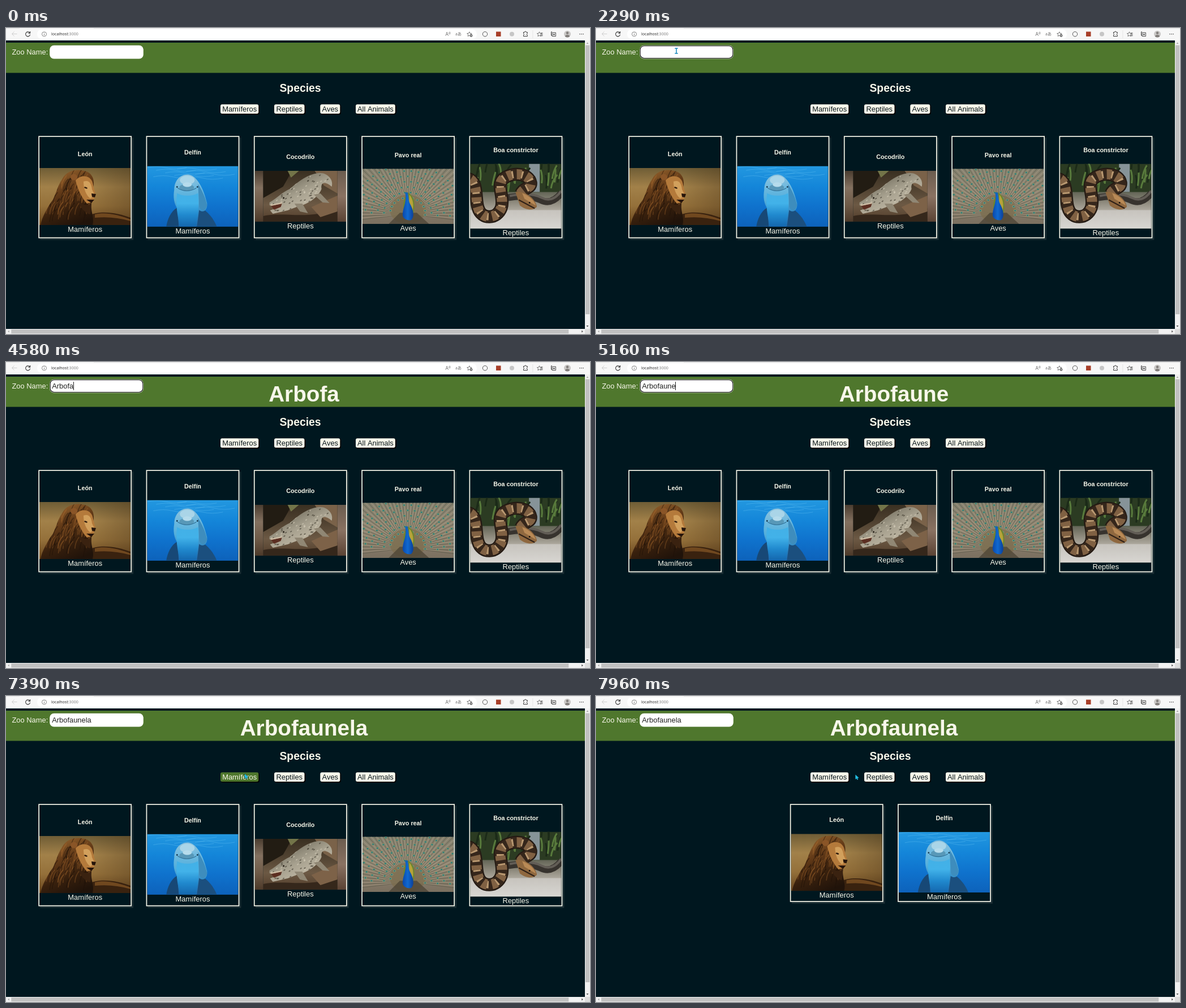
An HTML page with a canvas for the animation above (8000 ms loop, 1032 px wide and 542 px high).

```html
<!DOCTYPE html>
<html lang="es">
<head>
<meta charset="utf-8">
<title>Zoo</title>
<style>
  html, body { margin: 0; width: 100%; height: 100%; overflow: hidden; background: #00171f; }
  canvas { display: block; }
</style>
</head>
<body>
<canvas id="stage" width="1032" height="542"></canvas>
<script>
const ctx = document.getElementById('stage').getContext('2d');
const LOOP = 8000;
const NIGHT = '#00171f', GREEN = '#4f772d', CREAM = '#f8f7ea';
const SANS = '"Liberation Sans", Arial, sans-serif';
const UI = '"Open Sans", "Noto Sans", sans-serif';
const ZOO = 'Arbofaunela';
const KEYS = [3030, 3860, 3930, 4260, 4420, 4580, 4750, 4900, 5160, 5300, 5460];
const CARET_ON = [[1800, 2290], [2860, 3610], [3860, 6050], [6560, 7090]];

// ---------- drawing helpers ----------
function rect(color, x, y, w, h) {
  ctx.fillStyle = color;
  ctx.fillRect(x, y, w, h);
}
function round(color, x, y, w, h, r) {
  ctx.fillStyle = color;
  ctx.beginPath();
  ctx.roundRect(x, y, w, h, r);
  ctx.fill();
}
function oval(color, x, y, rx, ry = rx, turn = 0) {
  ctx.fillStyle = color;
  ctx.beginPath();
  ctx.ellipse(x, y, rx, ry, turn, 0, Math.PI * 2);
  ctx.fill();
}
function shape(color, d) {
  ctx.fillStyle = color;
  ctx.fill(new Path2D(d));
}
function line(color, width, d) {
  ctx.strokeStyle = color;
  ctx.lineWidth = width;
  ctx.stroke(new Path2D(d));
}
function text(str, x, y, font, color, align = 'left') {
  ctx.font = font;
  ctx.fillStyle = color;
  ctx.textAlign = align;
  ctx.fillText(str, x, y);
}
function fade(x0, y0, x1, y1, ...colors) {
  const g = ctx.createLinearGradient(x0, y0, x1, y1);
  colors.forEach((c, i) => g.addColorStop(i / (colors.length - 1), c));
  return g;
}
function random(seed) {
  return () => (seed = seed * 16807 % 2147483647) / 2147483647;
}
function within(d, paint) {
  ctx.save();
  ctx.clip(new Path2D(d));
  paint();
  ctx.restore();
}

// ---------- pictures, each 161 wide ----------
function lion(h) {
  rect(fade(0, 0, 0, h, '#6f5d36', '#a28149', '#94703a', '#65431d'), 0, 0, 161, h);
  rect(fade(90, 0, 161, 0, 'rgba(70,50,24,0)', 'rgba(70,50,24,.35)'), 90, 0, 71, h);
  shape('#39220f', 'M88 84C108 74 140 80 161 88V101H70Z');
  shape('#70481f', 'M98 82C118 77 142 84 161 91V94C140 88 120 86 98 88Z');
  const mane = 'M40 20C48 4 66 1 80 5C92 8 97 18 96 30L92 62C90 78 98 88 94 101H2C4 88 14 70 24 56C30 44 33 30 40 20Z';
  shape(fade(30, 8, 70, 100, '#90602c', '#643b18', '#38200d', '#20130a'), mane);
  within(mane, () => {
    const rnd = random(11);
    for (let i = 0; i < 90; i++) {
      const x = 20 + rnd() * 72, y = rnd() * 75;
      line(i % 2 ? 'rgba(30,16,7,.45)' : 'rgba(170,108,48,.35)', 1.6, `M${x} ${y}q-8 8 -9 22`);
    }
  });
  shape('#b47a3b', 'M64 22C72 11 90 12 94 26L99 46L95 60L84 63C76 54 68 40 64 22Z');
  shape('#d2a05c', 'M78 24C88 20 92 28 93 38L98 48L90 54C82 48 78 36 78 24Z');
  oval('#8a5527', 61, 16, 6, 5.5);
  oval('#2d190c', 82, 35, 3, 1.4, .3);
  shape('#26150b', 'M92 45L100 46L98 52L93 51ZM83 56L97 56L92 62Z');
  shape('#3a2210', 'M68 56C76 66 86 68 92 63L90 82C80 80 72 70 68 56Z');
}

function dolphin(h) {
  rect(fade(0, 0, 0, h, '#2398e0', '#1486d9', '#0f72cd', '#0d62bb'), 0, 0, 161, h);
  for (let i = 0; i < 9; i++) {
    const y = 3 + i * 2.3, x = (i * 53) % 90;
    line('rgba(110,200,245,.35)', 1, `M${x} ${y}q18 -4 34 0t36 0`);
  }
  shape('#174876', 'M53 74C42 80 36 94 34 107H62L66 78Z');
  shape('#1b4f7e', 'M92 72C108 80 118 94 123 107H86Z');
  shape(fade(0, 15, 0, 107, '#8fc3dd', '#6db9df', '#52aedc', '#2e88c4', '#1d68ac'),
    'M48 42C48 26 58 15 72 15C88 16 100 40 106 66C107 78 100 84 92 78L88 107H56L54 76C47 66 46 54 48 42Z');
  shape('#3e8dbd', 'M90 32C98 44 104 58 106 70C102 82 95 80 92 72Z');
  shape(fade(0, 46, 0, 107, '#43b0e6', '#42b2e9', '#2089ce', '#1467ae'),
    'M53 48C62 54 80 54 90 48C92 66 90 90 86 107H58C54 90 50 68 53 48Z');
  oval('#aad5e8', 71, 25, 13, 8);
  oval('#5898b8', 70, 38, 13, 6);
  oval('#b6dcec', 71, 33, 8, 4);
  line('#2f6f95', 1.2, 'M54 39Q70 49 87 39');
  oval('#183b52', 53, 37, 1.4);
  oval('#183b52', 89, 37, 1.4);
}

function crocodile(h) {
  rect(fade(0, 0, 0, h, '#4b3d30', '#83705f', '#6f5b48', '#4c3929'), 0, 0, 15, h);
  rect(fade(0, 0, 0, h, '#6c5d4f', '#8a7262', '#5b4334'), 146, 0, 16, h);
  rect(fade(0, 0, 0, h, '#3a3022', '#4f4130', '#6c5944', '#513c2a'), 15, 0, 131, h);
  shape('#221c13', 'M15 0H66L50 28L15 48Z');
  shape('#737549', 'M58 0H78L64 12Z');
  shape('#7a6249', 'M106 0H146V40L122 26Z');
  shape('#35271b', 'M15 80C50 72 100 88 146 66V90H15Z');
  shape('#7d6248', 'M100 64L146 44V72L116 82Z');
  const body = 'M26 56C40 48 48 38 62 32C78 18 94 6 112 4C126 2 140 14 136 28C124 18 116 20 118 32C112 48 92 60 74 64L58 70L32 76L27 70L44 64L26 61Z';
  shape(fade(60, 20, 84, 66, '#7d7868', '#a6a08e', '#bdb5a2'), body);
  within(body, () => {
    const rnd = random(7);
    for (let i = 0; i < 150; i++) {
      const x = 24 + rnd() * 114, y = rnd() * 76;
      oval(i % 2 ? 'rgba(62,57,45,.6)' : 'rgba(216,208,188,.55)', x, y, 1.9, 1, -.6);
    }
  });
  shape('#5c2f22', 'M29 62L48 58L46 64L34 69Z');
  shape('#d0bfa6', 'M27 60L48 56L48 58L29 62Z');
  shape('#908774', 'M70 58L80 72L94 75L84 58ZM104 42L120 56L132 57L116 40Z');
  oval('#241f17', 51, 48, 1.5);
}

function peacock(h) {
  rect(fade(0, 0, 0, h, '#85816f', '#918673', '#7b7060'), 0, 0, 161, h);
  for (let i = 0; i <= 90; i++) {
    const a = Math.PI * (.96 + 1.08 * i / 90);
    const c = i % 2 ? 'rgba(181,166,142,.45)' : 'rgba(74,79,62,.42)';
    line(c, 1.2, `M80 80L${80 + 130 * Math.cos(a)} ${80 + 130 * Math.sin(a)}`);
  }
  oval('rgba(124,108,72,.6)', 80, 72, 32, 26);
  for (let ring = 1; ring < 8; ring++) {
    const n = 9 + ring * 2;
    for (let i = 0; i <= n; i++) {
      const a = Math.PI * (1 + (i + ring % 2 / 2) / n), r = 20 + ring * 11;
      const x = 80 + r * Math.cos(a), y = 78 + r * .86 * Math.sin(a);
      oval('#8f8862', x, y, 2.8, 2.4);
      oval('#4b9683', x, y, 2, 1.7);
      oval('#25456a', x, y, .8);
    }
  }
  shape('rgba(70,62,48,.65)', 'M46 98L66 78L96 78L118 98Z');
  shape('#6e852d', 'M80 42C92 48 95 64 88 86L73 76C71 64 73 50 80 42Z');
  shape('#b6a33a', 'M83 46C90 54 91 66 88 76L82 62Z');
  shape(fade(68, 0, 92, 0, '#083d9e', '#1169d0', '#0b378d'),
    'M77 42C83 44 80 54 84 62C91 74 92 86 86 91C78 92 70 88 71 80C72 68 78 58 76 47Z');
  oval('#1265b8', 78, 44, 2.6, 2.3);
}

function boa(h) {
  rect('#2b3b22', 0, 0, 161, h);
  shape('#869398', 'M104 0H123V50H104Z');
  const rnd = random(23);
  for (let i = 0; i < 34; i++) {
    const x = i % 3 ? rnd() * 98 : 125 + rnd() * 36, y = 14 + rnd() * 36;
    line(i % 2 ? '#587a3c' : '#1b2a18', 3, `M${x} ${y}q2 -14 ${rnd() * 16 - 4} -24`);
  }
  rect(fade(0, 48, 0, 86, '#5e6152', '#8b877a', '#b5b0a6'), 0, 50, 161, 36);
  rect(fade(0, 82, 0, h, '#c6c3bd', '#d8d6d2'), 0, 82, 161, h - 82);
  line('#37332e', 12, 'M66 60Q104 54 124 64T161 52');
  line('#625d56', 4, 'M70 57Q106 50 126 60T161 48');
  const body = 'M-8 26C16 26 8 62 14 78C20 100 48 98 55 78C61 60 46 38 58 27C74 14 104 16 107 34C108 44 94 42 90 52';
  line('#241a13', 23, body);
  line('#806143', 18, body);
  ctx.setLineDash([9, 8]);
  line('#35261b', 19, body);
  ctx.setLineDash([3, 14]);
  line('#b99870', 13, body);
  ctx.setLineDash([]);
  shape('#8f683f', 'M80 50C96 46 116 62 118 76C112 84 98 82 88 74Z');
  shape('#b98a56', 'M92 52C104 56 114 66 116 74L96 62Z');
  line('#2f2118', 2, 'M86 64L114 79');
  oval('#1b130d', 105, 69, 1.4);
}

const ANIMALS = [
  { name: 'León', kind: 'Mamíferos', top: 248, h: 101, paint: lion },
  { name: 'Delfín', kind: 'Mamíferos', top: 244.5, h: 107.4, paint: dolphin },
  { name: 'Cocodrilo', kind: 'Reptiles', top: 253, h: 90.3, paint: crocodile },
  { name: 'Pavo real', kind: 'Aves', top: 249.3, h: 97.7, paint: peacock },
  { name: 'Boa constrictor', kind: 'Reptiles', top: 240.5, h: 115, paint: boa },
];
const BUTTONS = [['Mamíferos', 379, 67.3], ['Reptiles', 474, 53.5], ['Aves', 555.3, 35], ['All Animals', 618, 69.8]];

function card(a, x, lift) {
  const y = 191.2, h = 181.2 - lift * 2, top = a.top - lift, mid = x + 82.4;
  rect('#1b2e34', x + 3, y + 3, 164.8, h);
  rect(CREAM, x, y, 164.8, h);
  rect(NIGHT, x + 1.7, y + 1.7, 161.4, h - 3.4);
  ctx.save();
  ctx.translate(x + 1.7, top);
  ctx.beginPath();
  ctx.rect(0, 0, 161.4, a.h);
  ctx.clip();
  a.paint(a.h);
  ctx.restore();
  text(a.name, mid, top - 20.8, `bold 10.75px ${SANS}`, CREAM, 'center');
  text(a.kind, mid, top + a.h + 11.7, `12.9px ${SANS}`, CREAM, 'center');
}

// ---------- browser chrome ----------
function toolbar(pillHover) {
  rect('#f7f7f7', 0, 0, 1032, 22);
  rect('#dedede', 0, 0, 24, .7);
  rect('#dedede', 155, 0, 877, .7);
  round(pillHover ? '#f3f3f3' : '#ffffff', 55, 2.5, 777, 17, 8);
  line('#cfcfcf', 1, 'M19.5 10.5H10.5M14.5 6.5L10.5 10.5L14.5 14.5');
  line('#333', 1.1, 'M42.2 9A4 4 0 1 0 42.6 11.5M42.6 6V9.3H39.3');
  line('#666', .8, 'M71.5 10.8A4 4 0 1 1 63.5 10.8A4 4 0 1 1 71.5 10.8M67.5 10V13M67.5 8.2V9');
  const font = `7.1px ${UI}`;
  text('localhost', 80, 13.3, font, '#222');
  text(':3000', 80 + ctx.measureText('localhost').width, 13.3, font, '#777');

  text('A', 776.5, 14, `8.5px ${UI}`, '#666');
  line('#666', .7, 'M782.5 7.5q1.2 1.5 0 3M784 6.5q2 2.5 0 5');
  text('aあ', 799.5, 13, `7px "Noto Sans CJK JP", "Noto Sans CJK", ${UI}`, '#666', 'center');
  const star = (x, y) => line('#555', .8, `M${x} ${y - 4}l1.2 2.6l2.9 .3l-2.1 2l.6 2.9l-2.6 -1.4l-2.6 1.4l.6 -2.9l-2.1 -2l2.9 -.3z`);
  star(818.8, 10.8);
  oval('#555', 822, 13.5, 2.4);
  line('#fff', .7, 'M820.7 13.5h2.6M822 12.2v2.6');
  line('#555', 1, 'M850.7 10.8A4.2 4.2 0 1 1 842.3 10.8A4.2 4.2 0 1 1 850.7 10.8');
  rect('#a83f29', 866, 6.5, 8.5, 8.5);
  oval('#c6c6c6', 894, 10.7, 4);
  line('#333', 1, 'M914.5 7.5h2a1.4 1.4 0 0 1 2.8 0h2v2.2a1.5 1.5 0 0 0 0 2.8v2.2h-6.8v-2.2a1.5 1.5 0 0 0 0 -2.8z');
  rect('#e0e0e0', 930.5, 4, .8, 14);
  star(942.5, 10.8);
  line('#333', .9, 'M945 9h3.5M945.5 11.3h3M945 13.6h3.5');
  line('#333', .9, 'M965 6.8h-1.5v6.4h1.5M965.2 8.2h6.2v6.5h-6.2zM968.3 9.8v3.4M966.6 11.5h3.4');
  oval('#c9c7c5', 992, 10.8, 6);
  oval('#817d7a', 992, 8.8, 2.2);
  shape('#817d7a', 'M988 15.2C988 10.8 996 10.8 996 15.2Q992 18 988 15.2Z');
  for (let i = -1; i < 2; i++) oval('#333', 1017 + i * 3, 10.8, .8);
}

function scrollbars() {
  rect('#f1f1f1', 1023, 22, 9, 511);
  rect('#f1f1f1', 0, 533, 1023, 9);
  rect('#dcdcdc', 1023, 533, 9, 9);
  rect('#c1c1c1', 1024, 30.5, 7.2, 476.5);
  rect('#c1c1c1', 9.3, 534, 985, 7.2);
  shape('#a3a3a3', 'M1025.5 28L1027.5 25.5L1029.5 28Z');
  shape('#505050', 'M1025.5 527L1027.5 529.5L1029.5 527ZM1017.3 535.5L1019.8 537.5L1017.3 539.5Z');
  shape('#a3a3a3', 'M5.7 535.5L3.2 537.5L5.7 539.5Z');
}

// ---------- state over time ----------
const mix = (a, b, p) => a + (b - a) * p;
const step = (t, start, ms, count) => Math.min(Math.floor((t - start) / ms), count - 1);

function pointerAt(t) {
  if (t < 1080 || (t >= 3860 && t < 6490)) return null;
  if (t < 3860) {
    const p = step(t, 1080, 80, 6) / 5;
    return { x: mix(152, 142, p), y: mix(7, 40.5, p), beam: true };
  }
  if (t < 7720) {
    const p = step(t, 6490, 74, 11) / 10, q = 1 - p;
    const x = q * q * 142 + 2 * p * q * 190 + p * p * 422;
    const y = q * q * 40.5 - 2 * p * q * 15 + p * p * 138;
    return { x, y, beam: x < 242 && y > 31 && y < 54 };
  }
  const p = (step(t, 7720, 80, 4) + 1) / 4;
  return { x: mix(422, 458.5, p), y: mix(138, 139.5, p), beam: false };
}

function pointer({ x, y, beam }) {
  ctx.save();
  ctx.translate(x, y);
  if (beam) {
    line('#1487bd', 1.5, 'M-2.7 -4.5H2.7M0 -4.5V4.5M-2.7 4.5H2.7');
  } else {
    const d = 'M0 0V8L1.9 6.4L3.2 9L4.6 8.3L3.4 5.8L6 5.6Z';
    line('#083a48', 1, d);
    shape('#22bfe4', d);
  }
  ctx.restore();
}

function input(t, typed) {
  const focused = t >= 1800 && t < 7390;
  round('#fff', 77.2, 30.8, 165.6, 23.6, 7.5);
  if (focused) {
    ctx.strokeStyle = '#101010';
    ctx.lineWidth = 1.1;
    ctx.beginPath();
    ctx.roundRect(78.2, 31.7, 163.6, 21.8, 6.8);
    ctx.stroke();
  }
  text(typed, 81.2, 46.9, `12.9px ${SANS}`, '#222');
  if (CARET_ON.some(([a, b]) => t >= a && t < b)) {
    rect('#222', Math.round(81 + ctx.measureText(typed).width), 35, 1, 15);
  }
}

function buttons(mouse) {
  for (const [label, x, w] of BUTTONS) {
    const over = mouse && mouse.x >= x && mouse.x <= x + w && mouse.y >= 135 && mouse.y <= 152;
    round('#000', x + .8, 136, w + .8, 17.2, 3);
    round(over ? GREEN : CREAM, x, 135.2, w, 16.6, 3);
    text(label, x + w / 2, 148, `12.9px ${SANS}`, over ? CREAM : '#06141a', 'center');
  }
}

function draw(t) {
  const mouse = pointerAt(t);
  const typed = ZOO.slice(0, KEYS.filter(k => t >= k).length);
  const filtered = t >= 7480;

  rect(NIGHT, 0, 0, 1032, 542);
  rect(GREEN, 0, 26, 1023, 53.5);
  toolbar(mouse && mouse.y < 20);
  text('Zoo Name:', 10.5, 46.9, `12.9px ${SANS}`, CREAM);
  input(t, typed);
  text(typed, 526.5, 70.3, `bold 38.7px ${SANS}`, CREAM, 'center');
  text('Species', 520, 113, `bold 19.35px ${SANS}`, CREAM, 'center');
  buttons(mouse);

  const shown = filtered ? ANIMALS.filter(a => a.kind === 'Mamíferos') : ANIMALS;
  const left = filtered ? 342.8 : 57.3;
  shown.forEach((a, i) => card(a, left + i * 190.3, filtered ? 3.8 : 0));
  scrollbars();
  if (mouse) pointer(mouse);
}

const start = performance.now();
function tick() {
  draw((performance.now() - start) % LOOP);
  requestAnimationFrame(tick);
}
tick();
</script>
</body>
</html>
```
